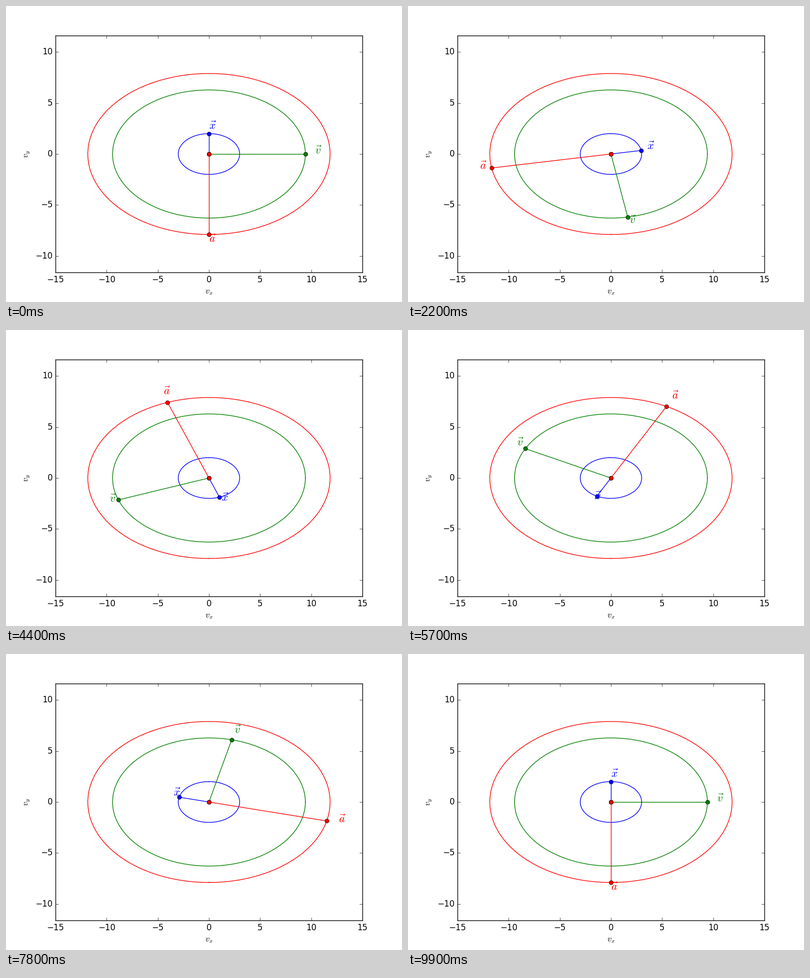
These frames come from a looping animation (800 by 600 pixels, 10 s). A matplotlib script:

```python
import numpy as np
import matplotlib.pyplot as plt
from matplotlib.animation import FuncAnimation

plt.style.use("classic")

FRAMES = 100
OMEGA = np.pi
A, B = 3, 2            # semi-axes of the orbit
ACC_SCALE = 0.4        # shrinks the acceleration to fit the axes
HALF_W = 15
HALF_H = HALF_W * 480 / 620   # equal units on both axes

theta = np.linspace(0, 2 * np.pi, FRAMES)
sin, cos = np.sin(theta), np.cos(theta)
pos = np.array([A * sin, B * cos])
vel = OMEGA * np.array([A * cos, -B * sin])
acc = -ACC_SCALE * OMEGA**2 * pos

# name, path, colour, label distance relative to the vector
VECTORS = [
    ("x", pos, "b", 1.2),
    ("v", vel, "g", 1.1),
    ("a", acc, "r", 1.1),
]

fig = plt.figure(figsize=(8, 6), dpi=100, facecolor="white")
ax = fig.add_axes([0.125, 0.1, 0.775, 0.8])
ax.set_xlim(-HALF_W, HALF_W)
ax.set_ylim(-HALF_H, HALF_H)
ax.set_xticks(range(-15, 16, 5))
ax.set_yticks(range(-10, 11, 5))
ax.set_xlabel("$v_x$")
ax.set_ylabel("$v_y$")

for _, path, color, _ in VECTORS:
    ax.plot(*path, color=color)

arms = [ax.plot([], [], "o-", color=color)[0] for _, _, color, _ in VECTORS]
labels = [ax.text(0, 0, rf"$\vec{{{name}}}$", color=color, fontsize=16)
          for name, _, color, _ in VECTORS]


def update(i):
    for (_, path, _, reach), arm, label in zip(VECTORS, arms, labels):
        x, y = path[:, i]
        arm.set_data([0, x], [0, y])
        label.set_position((reach * x, reach * y))
    return arms + labels


anim = FuncAnimation(fig, update, frames=FRAMES, interval=100,
                     repeat=True, repeat_delay=0, blit=False)
plt.show()
```
